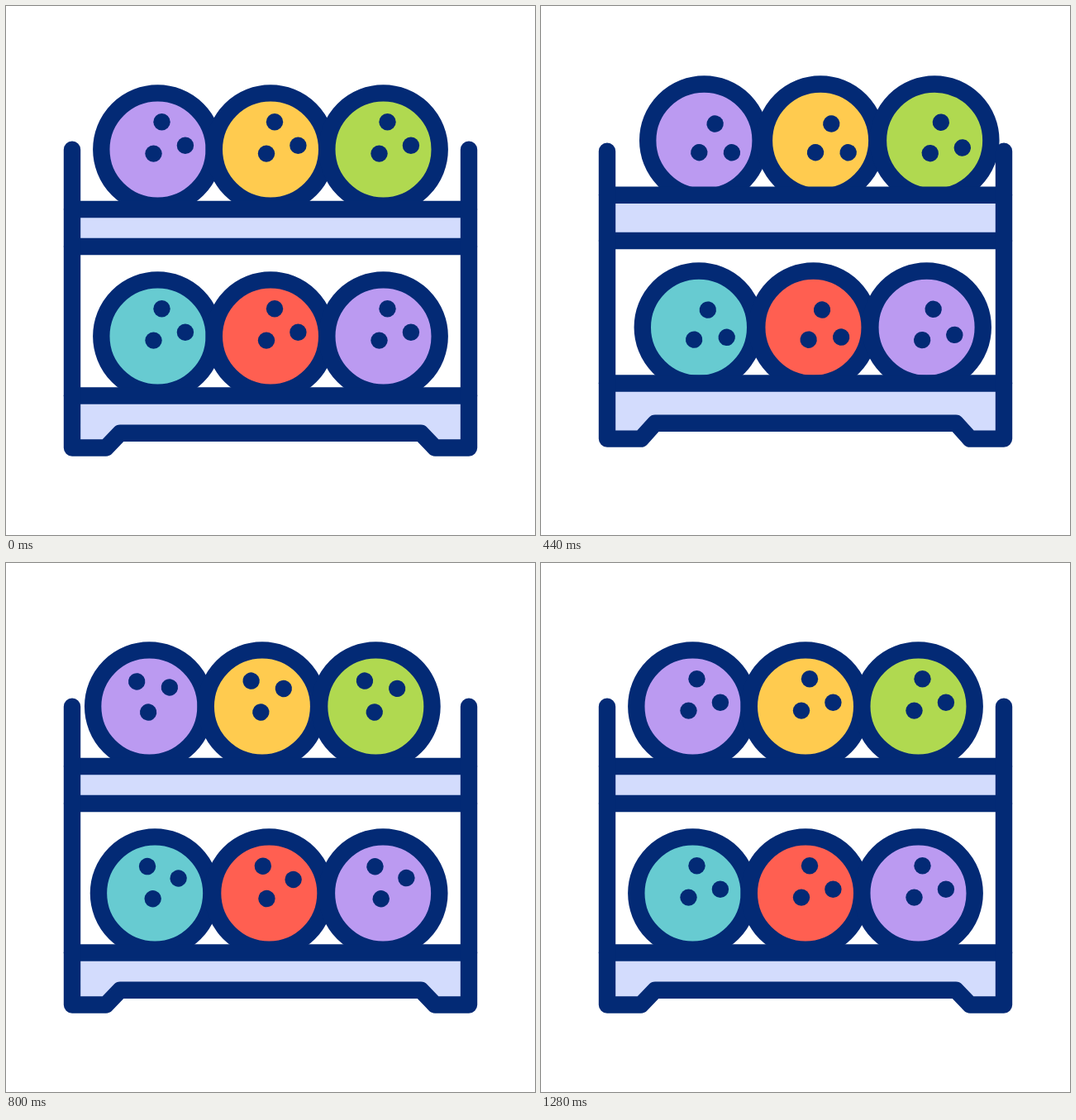
These frames come from a looping animation (640 px wide and 640 px high, 1480 ms). An HTML page:

```html
<!DOCTYPE html>
<html lang="en">
<head>
<meta charset="utf-8">
<title>Bowling ball rack</title>
<style>
  html, body { margin: 0; height: 100%; overflow: hidden; background: #fff; }
  svg { display: block; width: 100vw; height: 100vh; }
  #balls, #rack { stroke: #032a75; stroke-width: 20.4; stroke-linecap: round; stroke-linejoin: round; }
  #rack { fill: none; }
  .panel { fill: #d3dcfd; stroke: none; }
  .dots { fill: #032a75; stroke: none; }
</style>
</head>
<body>
<svg viewBox="0 0 640 640">
  <g id="balls"></g>
  <g id="rack">
    <path class="panel" id="shelfFill"/>
    <path class="panel" id="baseFill"/>
    <path id="shelf"/>
    <path id="base"/>
    <path id="posts"/>
  </g>
</svg>
<script>
const LOOP = 1480, STEP = 40, ROW_DELAY = 240;
const NS = 'http://www.w3.org/2000/svg';
const $ = id => document.getElementById(id);

const smooth = u => u * u * (3 - 2 * u);

// Eased value at t through the given key times and values
function track(t, times, values) {
  if (t <= times[0]) return values[0];
  for (let i = 1; i < times.length; i++) {
    if (t < times[i]) {
      const u = (t - times[i - 1]) / (times[i] - times[i - 1]);
      return values[i - 1] + (values[i] - values[i - 1]) * smooth(u);
    }
  }
  return values[values.length - 1];
}

const hop = (t, up, down) => track(t, [80, 320, 560, 720], [0, up, down, 0]);
const roll = (t, right, left) => track(t, [80, 360, 680, 1040], [0, right, left, 0]);

function add(parent, tag, attrs) {
  const el = document.createElementNS(NS, tag);
  for (const k in attrs) el.setAttribute(k, attrs[k]);
  return parent.appendChild(el);
}

const rows = [
  { y: 173.6, delay: 0, colors: ['#bb9af1', '#ffcb4f', '#b0d950'] },
  { y: 399.6, delay: ROW_DELAY, colors: ['#67cbd1', '#ff5f51', '#bb9af1'] }
];
// Per column: roll distance and turn, to the right then to the left
const columns = [
  { x: 183.5, shift: [19, -13.7], turn: [26, -47.5] },
  { x: 320, shift: [24, -13.6], turn: [25, -42.8] },
  { x: 456.5, shift: [25.6, -12.4], turn: [13.5, -43] }
];
const holes = [[5, -33.4], [33.4, -4.8], [-5, 5]];

const balls = rows.flatMap(row => columns.map((col, i) => {
  const disc = add($('balls'), 'circle', { r: 68.2, fill: row.colors[i] });
  const dots = add($('balls'), 'g', { class: 'dots' });
  holes.forEach(([cx, cy]) => add(dots, 'circle', { cx, cy, r: 10.2 }));
  return { row, col, disc, dots };
}));

function draw(t) {
  const jump = hop(t, -21.8, 0);

  for (const { row, col, disc, dots } of balls) {
    const s = t - row.delay;
    const x = col.x + roll(s, ...col.shift);
    disc.setAttribute('cx', x);
    disc.setAttribute('cy', row.y + jump);
    // The holes turn in place and do not follow the jump
    dots.setAttribute('transform', `translate(${x} ${row.y}) rotate(${roll(s, ...col.turn)})`);
  }

  const post = 173.7 + hop(t, -30, 34);
  const shelfTop = 246 + hop(t, -39.5, 5);
  const shelfLow = 291 + hop(t, -19.5, 5.5);
  const baseTop = 471.5 + hop(t, -36, 6);
  const baseLow = 516.7 + hop(t, -28, 4);
  const foot = 534.5 + jump;
  const set = (id, d) => $(id).setAttribute('d', d);

  const feet = `V${foot}H121L138 ${baseLow}H502L519 ${foot}H560V`;
  set('shelfFill', `M80 ${shelfTop}H560V${shelfLow}H80Z`);
  set('baseFill', `M80 ${baseTop}${feet}${baseTop}Z`);
  set('shelf', `M80 ${shelfTop}H560M80 ${shelfLow}H560`);
  set('base', `M80 ${baseTop}H560`);
  set('posts', `M80 ${post}${feet}${post}`);
}

const start = performance.now();
function tick() {
  const t = (performance.now() - start) % LOOP;
  draw(Math.floor(t / STEP) * STEP);
  requestAnimationFrame(tick);
}
draw(0);
requestAnimationFrame(tick);
</script>
</body>
</html>
```
